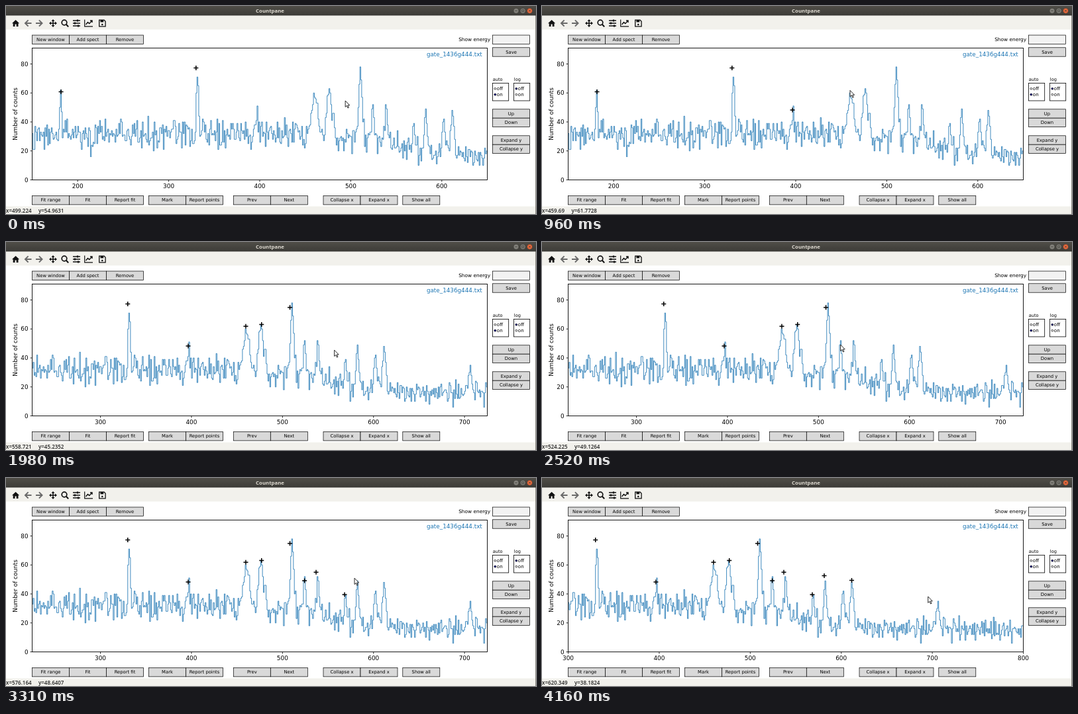
These frames come from a looping animation (800 by 314 pixels, 4220 ms). An HTML page:

```html
<!DOCTYPE html>
<html lang="en">
<head>
<meta charset="utf-8">
<title>Countpane</title>
<style>
html, body { margin: 0; width: 100%; height: 100%; overflow: hidden; background: #fff; }
svg { display: block; width: 800px; height: 314px; font-family: "DejaVu Sans", sans-serif; }
text { white-space: pre; }
.ui { font-family: "Open Sans", "Noto Sans", sans-serif; }
</style>
</head>
<body>
<svg id="stage" viewBox="0 0 800 314">
  <defs>
    <linearGradient id="bar" x2="0" y2="1">
      <stop stop-color="#504e48"/><stop offset="1" stop-color="#3c3b37"/>
    </linearGradient>
    <clipPath id="plotArea"><rect x="39.5" y="63.5" width="687" height="199"/></clipPath>
  </defs>
  <rect width="800" height="314" fill="#fff"/>
  <rect y="14" width="800" height="21.5" fill="#f2f1ec"/>
  <rect y="302.5" width="800" height="11.5" fill="#f2f1ec"/>
  <rect x="799" y="14" width="1" height="300" fill="#8a8882"/>
  <rect width="800" height="14.4" fill="url(#bar)"/>
  <g stroke="#35342f" stroke-width=".6">
    <circle cx="770" cy="7.2" r="4" fill="#82807a"/>
    <circle cx="780.2" cy="7.2" r="4" fill="#82807a"/>
    <circle cx="790.5" cy="7.2" r="4" fill="#ee6a3c"/>
  </g>
  <path d="M768.3 7.2h3.4M778.7 5.8h3v2.8h-3zM789 5.7l3 3m0-3l-3 3" fill="none" stroke="#3c3b37" stroke-width=".8"/>

  <g fill="none" stroke="#111" stroke-width="1.5">
    <path d="M9 26.2L14.6 21l5.6 5.2h-1.7V31h-2.8v-3.4h-2.2V31h-2.8v-4.8z" fill="#111" stroke="none"/>
    <path d="M38.5 26H29m4.6-4.6L29 26l4.6 4.6M45 26h9.5m-4.6-4.6l4.6 4.6-4.6 4.6" stroke="#6a6a6a" stroke-width="2"/>
    <path d="M71 22v8M67 26h8"/>
    <path d="M71 20l2.5 3h-5zM71 32l2.5-3h-5zM65 26l3-2.5v5zM77 26l-3-2.5v5z" fill="#111" stroke="none"/>
    <circle cx="88" cy="25" r="3.8" stroke-width="1.7"/><path d="M90.8 27.8l3.4 3.6" stroke-width="2.1"/>
    <path d="M101 22h11M101 26h11M101 30h11" stroke-width="1.3"/>
    <path d="M108 20.5v3M104 24.5v3M109 28.5v3" stroke-width="2.2"/>
    <path d="M118.7 20.5v10.3H131" stroke-width="1.2"/><path d="M120.5 28l3-3.4 2.3 2 4-4.6m-2.8 0h3v3" stroke-width="1.4"/>
    <path d="M140.7 21.2h7.4l2 2v7.6h-9.4z" stroke-width="1.3"/><path d="M142.5 21v3.4h4.7V21z" fill="#111" stroke="none"/>
    <circle cx="145.3" cy="28" r="1.3" fill="#111" stroke="none"/>
  </g>

  <g id="widgets"></g>
  <g clip-path="url(#plotArea)">
    <path id="trace" fill="none" stroke="#1f77b4" stroke-width=".85"/>
  </g>
  <rect x="39.5" y="63.5" width="687" height="199" fill="none" stroke="#000" stroke-width=".9"/>
  <g id="yAxis"></g>
  <g id="xAxis"></g>
  <g id="marks"></g>
  <text id="status" class="ui" x="0" y="311.5" font-size="8" font-weight="600" fill="#222"></text>
  <path id="cursor" d="M0 0V9.4L2.2 7.4 3.8 11 5.3 10.3 3.7 6.9H6.6Z" fill="#fff" stroke="#111" stroke-width=".9" stroke-linejoin="round"/>
</svg>
<script>
const NS = 'http://www.w3.org/2000/svg';
const LOOP = 4220, LEFT = 39.5, RIGHT = 726.5, FLOOR = 262.5;
const FIRST = 150, LAST = 800, SPAN = 500;
const PX_X = (RIGHT - LEFT) / SPAN, PX_Y = 175 / 80;
const $ = id => document.getElementById(id);

// The view scrolls in two hard jumps
const viewAt = t => t < 1860 ? 150 : t < 4150 ? 225 : 300;
const toX = (energy, start) => LEFT + (energy - start) * PX_X;
const toY = counts => FLOOR - counts * PX_Y;

function add(parent, tag, attrs, content) {
  const node = document.createElementNS(NS, tag);
  for (const key in attrs) node.setAttribute(key, attrs[key]);
  if (content !== undefined) node.textContent = content;
  parent.appendChild(node);
  return node;
}
function label(parent, x, y, size, content, anchor = 'middle', extra = {}) {
  return add(parent, 'text', { x, y, 'font-size': size, 'text-anchor': anchor, ...extra }, content);
}

// Static controls
const ui = $('widgets');
function button(x, y, name, fill = '#d9d9d9') {
  add(ui, 'rect', { x, y, width: 56, height: 13.4, fill, stroke: '#000', 'stroke-width': .7 });
  label(ui, x + 28, y + 8.8, 6.8, name);
}
function buttonRow(x, y, names) {
  names.forEach((name, i) => button(x + i * 56, y, name));
}
function buttonColumn(y, names) {
  names.forEach((name, i) => button(734.5, y + i * 13.4, name));
}
function radio(x, title, active) {
  label(ui, x + .3, 113, 6.6, title, 'start');
  add(ui, 'rect', { x, y: 116.5, width: 24.2, height: 26.5, fill: '#fff', stroke: '#000', 'stroke-width': .8 });
  ['off', 'on'].forEach((name, i) => {
    const y = 124.8 + i * 8.9;
    add(ui, 'circle', { cx: x + 3.8, cy: y, r: 1.4, fill: name === active ? '#00008b' : '#fff', stroke: '#000', 'stroke-width': .7 });
    label(ui, x + 6.3, y + 2.5, 7.1, name, 'start');
  });
}
label(ui, 398.5, 10.2, 7.8, 'Countpane', 'middle', { class: 'ui', 'font-weight': 700, fill: '#dfdbd2' });
buttonRow(39.5, 44, ['New window', 'Add spect', 'Remove']);
buttonRow(39.5, 286.5, ['Fit range', 'Fit', 'Report fit']);
buttonRow(215.5, 286.5, ['Mark', 'Report points']);
buttonRow(343.3, 286.5, ['Prev', 'Next']);
buttonRow(479, 286.5, ['Collapse x', 'Expand x']);
button(598.8, 286.5, 'Show all');
button(734.5, 44, '', '#f2f2f2');
buttonColumn(62.8, ['Save']);
buttonColumn(155.8, ['Up', 'Down']);
buttonColumn(195.8, ['Expand y', 'Collapse y']);
radio(734.5, 'auto', 'on');
radio(766.5, 'log', 'off');
label(ui, 731.2, 53.2, 7.4, 'Show energy', 'end');
label(ui, 718.8, 76, 8.8, 'gate_1436g444.txt', 'end', { fill: '#1f77b4' });
label(ui, 0, 0, 8.9, 'Number of counts', 'middle', { transform: 'translate(16.6 163) rotate(-90)' });
for (let counts = 0; counts <= 80; counts += 20) {
  const y = toY(counts);
  add($('yAxis'), 'path', { d: `M${LEFT} ${y}h-3`, stroke: '#000', 'stroke-width': .8 });
  label($('yAxis'), 33.5, y + 3.2, 8.8, counts, 'end');
}

// Spectrum: Gaussian lines (energy, height, width) on a falling, noisy background
const LINES = [
  [181.5, 27, 1], [331.7, 47, 1], [397, 13, 1.8], [460.5, 28, 3], [476.5, 32, 2.8],
  [510.7, 49, 1.7], [524.3, 25, 1.4], [538.7, 30, 1], [569.5, 19, 1], [582.3, 29, 1.4],
  [602, 22, 1.5], [611.7, 29, 1.7], [706, 16, 1.5]
];
let seed = 1436;
function random() {
  seed = (seed * 1664525 + 1013904223) % 2 ** 32;
  return seed / 2 ** 32;
}
function channel(energy) {
  const base = 16 + 15.5 / (1 + Math.exp((energy - 550) / 28));
  const signal = LINES.reduce((sum, [centre, height, width]) =>
    sum + height * Math.exp(-(((energy - centre) / width) ** 2) / 2), 0);
  const noise = (random() + random() + random() - 1.5) * 2 * Math.sqrt(base);
  return Math.round(base + signal + noise * base / (base + signal));
}
let steps = `M${LEFT} ${toY(channel(FIRST))}`;
for (let energy = FIRST; energy < LAST; energy++) {
  steps += `V${toY(channel(energy + .5)).toFixed(1)}H${toX(energy + 1, FIRST).toFixed(2)}`;
}
$('trace').setAttribute('d', steps);

// Pointer stops; a marking stop lasts HOLD ms and leaves a cross behind
const HOLD = 120, LAG = 70;
const stop = (time, energy, counts, marks = true) =>
  ({ time, leave: time + (marks ? HOLD : 0), energy, counts, marks, x: toX(energy, viewAt(time)), y: toY(counts) });
const STOPS = [
  stop(-LAG, 499.225, 54.9632, false),
  stop(450, 396.4, 48.2),
  stop(880, 459.69, 61.7728),
  stop(1180, 477, 63.1),
  stop(1500, 508.14, 74.9056),
  stop(1910, 558.721, 45.2352, false),
  stop(2430, 524.225, 49.1264),
  stop(2700, 536.9, 55),
  stop(3060, 568.2, 39.5),
  stop(3240, 576.163, 48.64, false),
  stop(3370, 581.3, 52.6),
  stop(3680, 611.5, 49.4),
  stop(4000, 620.349, 38.1824, false)
];
function pointerAt(t) {
  const next = STOPS.findIndex(s => s.time > t);
  if (next < 0) return STOPS[STOPS.length - 1];
  const a = STOPS[next - 1], b = STOPS[next];
  const u = Math.max(0, (t - a.leave) / (b.time - a.leave)), ease = u * u * (3 - 2 * u);
  return { x: a.x + (b.x - a.x) * ease, y: a.y + (b.y - a.y) * ease };
}
// The readout trails the pointer slightly
function readout(t) {
  const { x, y } = pointerAt(t - LAG);
  const compact = value => String(+value.toPrecision(6));
  return `x=${compact(viewAt(t - LAG) + (x - LEFT) / PX_X)}     y=${compact((FLOOR - y) / PX_Y)}`;
}

const crosses = [stop(-HOLD, 181.7, 60.8), stop(-HOLD, 330, 77.3), ...STOPS.filter(s => s.marks)].map(s =>
  ({ ...s, node: add($('marks'), 'path', { d: 'M-3.5 0h7M0-3.5v7', stroke: '#000', 'stroke-width': 1.5 }) }));

let shownStart;
function showView(start) {
  if (start === shownStart) return;
  shownStart = start;
  $('trace').setAttribute('transform', `translate(${(FIRST - start) * PX_X} 0)`);
  $('xAxis').replaceChildren();
  for (let tick = Math.ceil(start / 100) * 100; tick <= start + SPAN; tick += 100) {
    const x = toX(tick, start);
    add($('xAxis'), 'path', { d: `M${x} ${FLOOR}v3`, stroke: '#000', 'stroke-width': .8 });
    label($('xAxis'), x, 275, 8.9, tick);
  }
}
function draw(t) {
  const start = viewAt(t);
  showView(start);
  for (const { node, leave, energy, y } of crosses) {
    const x = toX(energy, start);
    node.setAttribute('transform', `translate(${x} ${y})`);
    node.setAttribute('visibility', t >= leave && x > LEFT && x < RIGHT ? 'visible' : 'hidden');
  }
  const { x, y } = pointerAt(t);
  $('cursor').setAttribute('transform', `translate(${x} ${y})`);
  $('status').textContent = readout(t);
}
const began = performance.now();
function tick() {
  draw((performance.now() - began) % LOOP);
  requestAnimationFrame(tick);
}
draw(0);
requestAnimationFrame(tick);
</script>
</body>
</html>
```
